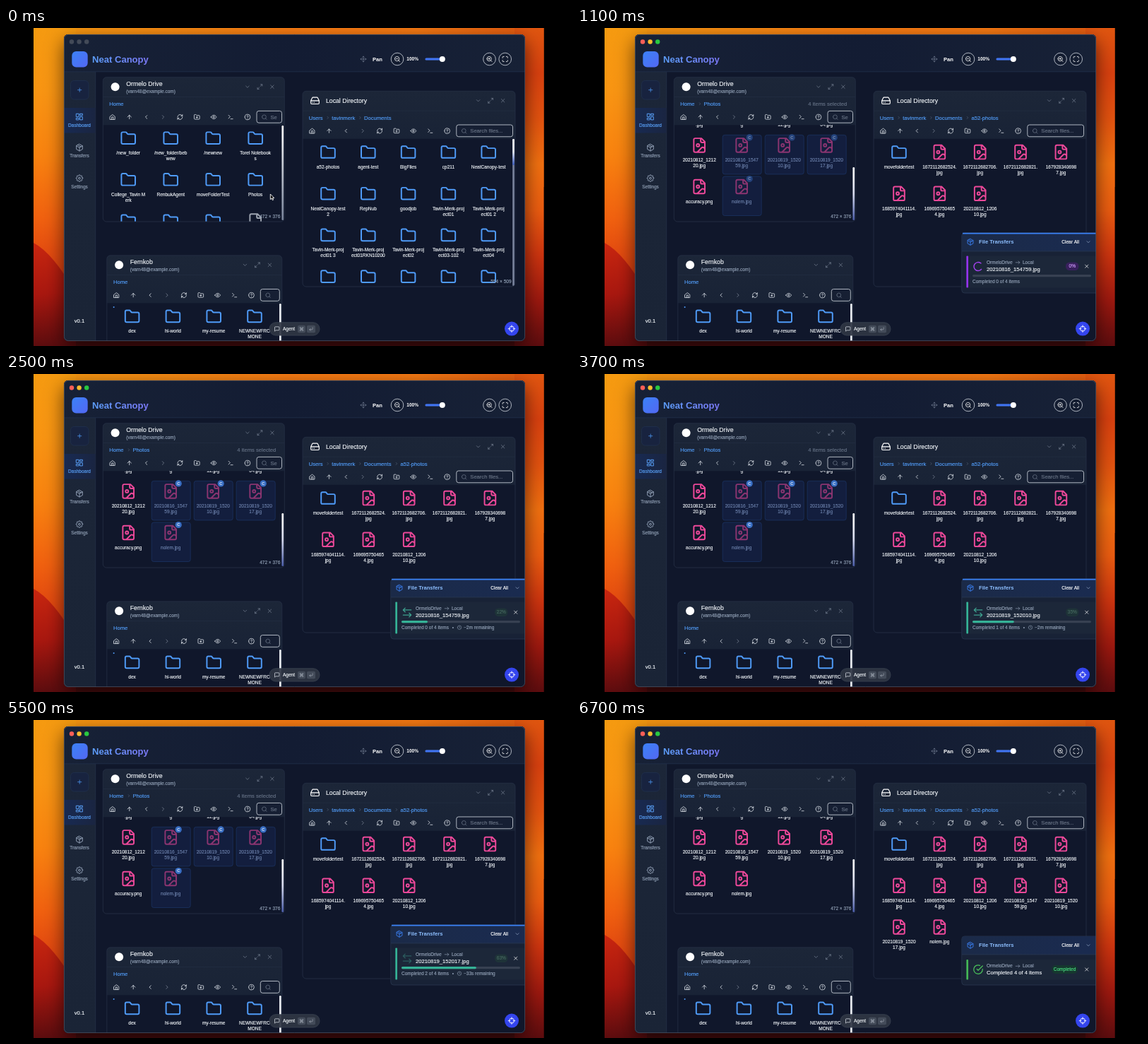
Write an HTML page with a canvas that moves like this. It is 800x450 px and loops after 6.8 s.

```html
<!DOCTYPE html>
<html lang="en">
<head>
<meta charset="utf-8">
<title>File dashboard</title>
<style>
html, body { margin: 0; width: 100%; height: 100%; overflow: hidden; background: #000; }
canvas { display: block; width: 800px; height: 450px; }
</style>
</head>
<body>
<canvas id="stage"></canvas>
<script>
const LOOP = 6800, STEP = 100;
const FONT = '"Liberation Sans", Arial, sans-serif';
const SM = 6.53, MD = 7.62, LG = 8.71;
const WHITE = '#f1f5f9', GRAY = '#94a3b8', DIM = '#64748b', BLUE = '#4f9bf8', PINK = '#ec4899';

const canvas = document.getElementById('stage');
const ctx = canvas.getContext('2d');
const dpr = window.devicePixelRatio || 1;
canvas.width = 800 * dpr;
canvas.height = 450 * dpr;

// ---- icons on a 24 unit grid ----
const ring = (x, y, r) => `M${x - r} ${y}a${r} ${r} 0 1 0 ${2 * r} 0 ${r} ${r} 0 1 0 ${-2 * r} 0`;
const folder = 'M20 20a2 2 0 0 0 2-2V8a2 2 0 0 0-2-2h-7.9a2 2 0 0 1-1.7-.9L9.6 3.9A2 2 0 0 0 7.9 3H4a2 2 0 0 0-2 2v13a2 2 0 0 0 2 2z';
const file = 'M15 2H6a2 2 0 0 0-2 2v16a2 2 0 0 0 2 2h12a2 2 0 0 0 2-2V7zM14 2v4a2 2 0 0 0 2 2h4';
const search = ring(11, 11, 8) + 'M21 21l-4.3-4.3';

function gear() {
  let d = '';
  for (let i = 0; i < 32; i++) {
    const r = i % 4 < 2 ? 10 : 7.8, a = (i - 0.5) * Math.PI / 16;
    d += (i ? 'L' : 'M') + (12 + r * Math.cos(a)) + ' ' + (12 + r * Math.sin(a));
  }
  return d + 'z' + ring(12, 12, 3);
}

const ICONS = {
  home: 'M3 10l9-7 9 7v11H3zM9 21v-9h6v9',
  up: 'M12 19V5M5 12l7-7 7 7',
  left: 'M15 18l-6-6 6-6',
  right: 'M9 18l6-6-6-6',
  down: 'M6 9l6 6 6-6',
  refresh: 'M3 12a9 9 0 0 1 15-6.7L21 8M21 3v5h-5M21 12a9 9 0 0 1-15 6.7L3 16M3 21v-5h5',
  folder, file, search,
  addFolder: folder + 'M12 10v6M9 13h6',
  eye: 'M2 12s3.5-7 10-7 10 7 10 7-3.5 7-10 7S2 12 2 12z' + ring(12, 12, 3),
  term: 'M4 17l6-6-6-6M12 19h8',
  help: ring(12, 12, 10) + 'M9.1 9a3 3 0 0 1 5.8 1c0 2-3 3-3 3M12 17h.01',
  zoomIn: search + 'M11 8v6M8 11h6',
  zoomOut: search + 'M8 11h6',
  expand: 'M15 3h6v6M9 21H3v-6M21 3l-7 7M3 21l7-7',
  close: 'M18 6L6 18M6 6l12 12',
  disk: 'M22 12H2M5.5 5.1L2 12v6a2 2 0 0 0 2 2h16a2 2 0 0 0 2-2v-6l-3.5-6.9A2 2 0 0 0 16.8 4H7.2a2 2 0 0 0-1.7 1.1zM6 16h.01M10 16h.01',
  image: file + ring(10, 12, 2) + 'M20 17l-1.3-1.3a2.4 2.4 0 0 0-3.4 0L9 22',
  dash: 'M3 3h7v9H3zM14 3h7v5h-7zM14 12h7v9h-7zM3 16h7v5H3z',
  box: 'M12 2l9 5v10l-9 5-9-5V7zM3 7l9 5 9-5M12 12v10M7.5 4.5l9 5',
  gear: gear(),
  move: 'M12 2v20M2 12h20M9 5l3-3 3 3M9 19l3 3 3-3M5 9l-3 3 3 3M19 9l3 3-3 3',
  full: 'M8 3H5a2 2 0 0 0-2 2v3M21 8V5a2 2 0 0 0-2-2h-3M3 16v3a2 2 0 0 0 2 2h3M16 21h3a2 2 0 0 0 2-2v-3',
  chat: 'M21 15a2 2 0 0 1-2 2H7l-4 4V5a2 2 0 0 1 2-2h14a2 2 0 0 1 2 2z',
  enter: 'M9 10l-5 5 5 5M20 4v7a4 4 0 0 1-4 4H4',
  cmd: 'M9 6a3 3 0 1 0-3 3h12a3 3 0 1 0-3-3v12a3 3 0 1 0 3-3H6a3 3 0 1 0 3 3z',
  target: ring(12, 12, 8) + 'M12 1v6M12 17v6M1 12h6M17 12h6',
  swap: 'M8 3L4 7l4 4M4 7h16M16 21l4-4-4-4M20 17H4',
  clock: ring(12, 12, 10) + 'M12 6v6l4 2',
  check: 'M22 11v1a10 10 0 1 1-6-9.1M22 4L12 14l-3-3',
  plus: 'M12 5v14M5 12h14',
  arrow: 'M3 12h18M15 6l6 6-6 6'
};
for (const k in ICONS) ICONS[k] = new Path2D(ICONS[k]);

// ---- drawing helpers ----
function icon(name, x, y, size, color, weight = 2) {
  ctx.save();
  ctx.translate(x - size / 2, y - size / 2);
  ctx.scale(size / 24, size / 24);
  ctx.lineWidth = weight;
  ctx.lineCap = ctx.lineJoin = 'round';
  ctx.strokeStyle = color;
  ctx.stroke(ICONS[name]);
  ctx.restore();
}

function text(s, x, y, size, color, align = 'left', bold = false) {
  ctx.font = `${bold ? 'bold ' : ''}${size}px ${FONT}`;
  ctx.textAlign = align;
  ctx.fillStyle = ctx.strokeStyle = color;
  ctx.fillText(s, x, y + size * 0.35);
  if (!bold) {
    ctx.lineWidth = 0.15;
    ctx.strokeText(s, x, y + size * 0.35);
  }
}

function rect(x, y, w, h, r, fill, stroke) {
  ctx.beginPath();
  ctx.roundRect(x, y, w, h, r);
  if (fill) { ctx.fillStyle = fill; ctx.fill(); }
  if (stroke) { ctx.strokeStyle = stroke; ctx.lineWidth = 0.8; ctx.stroke(); }
}

function disc(x, y, r, fill, stroke) {
  rect(x - r, y - r, 2 * r, 2 * r, r, fill, stroke);
}

function ramp(x0, y0, x1, y1, ...colors) {
  const g = ctx.createLinearGradient(x0, y0, x1, y1);
  colors.forEach((c, i) => g.addColorStop(i / (colors.length - 1), c));
  return g;
}

function clipped(x, y, w, h, r, draw) {
  ctx.save();
  ctx.beginPath();
  ctx.roundRect(x, y, w, h, r);
  ctx.clip();
  draw();
  ctx.restore();
}

function faded(alpha, draw) {
  ctx.save();
  ctx.globalAlpha *= alpha;
  draw();
  ctx.restore();
}

// ---- file lists; "|" breaks a label ----
const IMG = /\.(jpg|png)$/;
const plain = s => s.replace('|', '');
const shots = ['20210816_1547|59.jpg', '20210819_1520|10.jpg', '20210819_1520|17.jpg', 'nolem.jpg'];
const proj = s => 'Tavin-Merk-proj|ect' + s;

const driveRoot = ['/new_folder', '/new_folder/beb|wew', '/newnew', 'Torel Notebook|s',
  'College_Tavin M|erk', 'RenbukAgent', 'moveFolderTest', 'Photos', 'notes', 'drafts', 'misc', 'list.txt'];
const photos = ['20210812_1206|.jpg', '20210812_12070.jp|g', '20210812_1209|12.jpg', '20210812_1211|04.jpg',
  '20210812_1212|20.jpg', ...shots.slice(0, 3), 'accuracy.png', shots[3]];
const localRoot = ['a52-photos', 'agent-test', 'BigFiles', 'cp211', 'NeatCanopy-test',
  'NeatCanopy-test|2', 'RepNub', 'goodjob', proj('01'), proj('01 2'),
  proj('01 3'), proj('01RKN10200'), proj('02'), proj('03-102'), proj('04'), 'one', 'two', 'three', 'four', 'five'];
const localPhotos = ['movefoldertest', '1672112682524.|jpg', '1672112682706.|jpg', '1672112682821.|jpg',
  '167928340698|7.jpg', '1685974041114.|jpg', '169695750465|4.jpg', '20210812_1206|10.jpg'];
const boxRoot = ['dex', 'hi-world', 'my-resume', 'NEWNEWFRO|MONE'];

function entry(name, x, y, chosen, badge) {
  if (chosen) rect(x - 27, y - 14.5, 55, 55.5, 3, 'rgba(30,58,128,.22)', '#1b3361');
  faded(chosen ? 0.55 : 1, () => {
    if (IMG.test(plain(name))) icon('image', x, y, 23.5, PINK);
    else if (name.endsWith('.txt')) icon('file', x, y, 23.5, '#9ca3af');
    else icon('folder', x, y + 0.4, 23.5, BLUE);
    name.split('|').forEach((s, i) => text(s, x, y + 21 + i * 8.2, SM, chosen ? '#a9c4f5' : WHITE, 'center'));
  });
  if (chosen && badge > 0) faded(badge, () => {
    disc(x + 11, y - 11, 4.6, '#3b73cc');
    text('C', x + 11, y - 11, 5.6, '#fff', 'center');
  });
}

function grid(names, cols, x, y, dx, dy, chosen = [], badge = 0) {
  names.forEach((n, i) => entry(n, x + (i % cols) * dx, y + Math.floor(i / cols) * dy, chosen.includes(n), badge));
}

// ---- panels ----
const TOOLS = ['home', 'up', 'left', 'right', 'refresh', 'addFolder', 'eye', 'term', 'help'];

function panel(p, content) {
  const { x, y, w, h } = p;
  rect(x, y, w, h, 5, '#10172b');
  clipped(x, y, w, h, 5, () => {
    rect(x, y, w, 67.5, 0, ramp(0, y, 0, y + 67, '#1c2638', '#192336'));
    rect(x, y + 27.5, w, 0.7, 0, '#222e42');
    clipped(x, y + 67.5, w, h - 67.5, 0, content);
  });
  rect(x, y, w, h, 5, null, '#263247');

  const cy = y + 13.5;
  if (p.mail) {
    disc(x + 17.3, cy, 6, '#fff');
    text(p.title, x + 33, y + 9, LG, WHITE);
    text(p.mail, x + 33, y + 20.3, SM, GRAY);
  } else {
    icon('disk', x + 17.5, cy, 14, '#fff');
    text(p.title, x + 33, cy, LG, WHITE);
  }
  ['down', 'expand', 'close'].forEach((n, i) => icon(n, x + w - 52.4 + i * 17.5, cy, 9, '#7c8799', 1.8));

  p.path.forEach(([s, px], i) => {
    text(s, px, y + 37.6, MD, '#529df9');
    if (i) icon('right', px - 5.5, y + 37.6, 6, DIM);
  });
  if (p.note) text(p.note, x + w - 12, y + 37.6, MD, '#667286', 'right');

  const ty = y + 56.3;
  TOOLS.forEach((n, i) => icon(n, x + 13.5 + i * 23.9, ty, 9.2, n === 'right' ? '#7b8596' : '#e5eaf1'));
  rect(p.sx, y + 47.7, p.sw, 16.8, 3, '#161f33', '#d5dbe4');
  icon('search', p.sx + 10.8, ty + 0.2, 8.7, '#6b7688');
  clipped(p.sx, y + 47.7, p.sw - 6.5, 16.8, 3, () => {
    if (p.hint) text(p.hint, p.sx + 19.5, ty, MD, '#6b7688');
  });
}

const MAIL = '(varn48@example.com)';

function drivePanel(t) {
  const opened = t >= 300, scrolled = t >= 400, chosen = t >= 700 && t < 6500;
  const badge = Math.min(0.95, Math.max(0, (t - 800) / 700));
  panel({
    x: 137.3, y: 69.7, w: 257, h: 204.3, title: 'Ormelo Drive', mail: MAIL, sx: 355, sw: 35.5, hint: 'Search files...',
    path: opened ? [['Home', 146.3], ['Photos', 179.5]] : [['Home', 146.3]],
    note: chosen ? '4 items selected' : ''
  }, () => {
    if (!opened) grid(driveRoot, 4, 173.2, 155.8, 60, 58.6);
    else grid(photos, 4, 173.2, scrolled ? 107.3 : 155.8, 60, 58.6, chosen ? shots : [], badge);
    if (scrolled) rect(390.4, 197, 2.7, 75, 1.3, ramp(0, 197, 0, 272, '#fff', '#d5d9ec', '#4a5ca8'));
    else rect(390.4, 138, 2.7, 134, 1.3, ramp(0, 138, 0, 272, '#fff', '#b8bec9', '#78839a'));
    text('472 × 376', 388.3, 267, SM, GRAY, 'right');
  });
}

function localPanel(t) {
  const opened = t >= 600;
  const path = [['Users', 428.8], ['tavinmerk', 461.3], ['Documents', 507]];
  if (opened) path.push(['a52-photos', 558.5]);
  panel({ x: 420, y: 89.3, w: 301, h: 276.7, title: 'Local Directory', path, sx: 637.8, sw: 79.7, hint: 'Search files...' }, () => {
    if (opened) grid(t >= 6500 ? localPhotos.concat(shots) : localPhotos, 5, 456, 175.6, 57.35, 58.7);
    else {
      grid(localRoot, 5, 456, 175.6, 56.8, 58.7);
      rect(717.2, 157, 2.7, 208, 1.3, '#77819a');
      rect(717.2, 157, 2.7, 37, 1.3, ramp(0, 157, 0, 194, '#fff', '#dfe5f5', '#3556b8'));
    }
    text('554 × 509', 715.5, 359, SM, GRAY, 'right');
  });
}

function boxPanel() {
  panel({ x: 142.8, y: 321.8, w: 248, h: 160, title: 'Fernkob', mail: MAIL, sx: 360.3, sw: 27, path: [['Home', 152]] }, () => {
    grid(boxRoot, 4, 178.6, 408, 57.8, 58.6);
    disc(152.6, 395, 1, BLUE);
    rect(387, 390, 2.7, 60, 1.3, '#e8ebf0');
  });
}

// ---- transfers ----
// start, file, percent, percent per second, time left; rate 0 means preparing
const STAGES = [
  [900, 0, 0, 0, ''], [1800, 0, 10, 17.15, '~2m'],
  [2700, 1, 25, 0, '~2m'], [3400, 1, 30, 16.7, '~2m'],
  [4200, 2, 50, 0, '~44s'], [5000, 2, 56, 14, '~33s'],
  [5800, 3, 75, 0, '~20s'], [6200, 3, 83, 43, '~9s']
];

function transferHead(y) {
  rect(544.8, y, 200, 375 - y, 4, '#182236', '#293650');
  rect(545, y, 200, 25.5, [4, 0, 0, 0], ramp(545, 0, 735, 0, '#1b2a48', '#1a2b50'));
  rect(545, y + 25.5, 200, 0.7, 0, '#2a3a58');
  icon('box', 557, y + 12.8, 10.5, '#3b82f6');
  text('File Transfers', 569, y + 12.8, MD, '#8bbcfb', 'left', true);
  text('Clear All', 686.3, y + 12.8, SM, '#fff');
  icon('down', 724, y + 12.8, 8, '#9db0d0');
}

function transferRoute(y) {
  text('OrmeloDrive', 580, y, SM, GRAY);
  icon('arrow', 624, y + 0.3, 7.5, GRAY);
  text('Local', 631, y, SM, GRAY);
}

function transfers(t) {
  if (t < 900) return;
  if (t >= 6500) {
    transferHead(306);
    rect(551.5, 339, 183, 28.5, 2, '#1c2739');
    rect(551.3, 339, 2.7, 28.5, 1, '#44b556');
    icon('check', 568, 353, 15, '#4ac25a');
    transferRoute(348);
    text('Completed 4 of 4 items', 580, 357.6, MD, WHITE);
    rect(672, 347, 37, 12, 6, '#16372f');
    text('Completed', 690.5, 353, SM, '#4ade80', 'center');
    icon('close', 721.7, 353, 8.5, '#fff');
    return;
  }
  const [start, idx, from, rate, left] = STAGES.filter(s => s[0] <= t).pop();
  const pct = Math.round(from + rate * (t - start) / 1000);
  const tone = rate ? '#35b296' : '#9333ea';

  transferHead(290);
  rect(546, 289.8, 200, 1.6, 0, '#3b82f6');
  rect(551.5, 322.5, 183, 45, 2, '#1c2739');
  rect(551.3, 322.5, 2.7, 45, 1, tone);
  if (rate) {
    const pulse = 0.68 + 0.27 * Math.cos((t - 2500) / 1200 * 2 * Math.PI);
    faded(pulse, () => icon('swap', 568, 337.5, 17, '#3fa692', 1.8));
  } else {
    const a = t / 1000 * 2 * Math.PI;
    ctx.beginPath();
    ctx.arc(568, 337.5, 6, a, a + 4.9);
    ctx.strokeStyle = '#a340ee';
    ctx.lineWidth = 1.4;
    ctx.stroke();
  }
  transferRoute(331.5);
  text(plain(shots[idx]), 580, 341.6, MD, WHITE);
  rect(692, 331.5, 18.5, 11.5, 5.5, rate ? '#1e3338' : '#38205c');
  text(pct + '%', 701.3, 337.2, SM, rate ? '#46695f' : '#cf9bfd', 'center');
  icon('close', 721.7, 337.2, 8.5, '#fff');
  rect(560, 349, 168, 3.2, 1.6, '#374152');
  if (pct) rect(560, 349, 168 * pct / 100, 3.2, 1.6, rate ? '#35b296' : ramp(560, 0, 645, 0, '#8b2fe0', '#b03cf5'));
  text(`Completed ${idx} of 4 items`, 560, 358.7, SM, GRAY);
  if (left) {
    text('•', 633, 358.7, SM, GRAY, 'center');
    icon('clock', 642, 358.7, 6.6, GRAY);
    text(left + ' remaining', 648, 358.7, SM, GRAY);
  }
}

// ---- surroundings ----
function wallpaper() {
  rect(0, 0, 800, 450, 0, '#000');
  clipped(39, 0, 722.5, 450, 0, () => {
    rect(39, 0, 723, 225, 0, ramp(39, 0, 762, 0, '#f59a10', '#f58a12', '#f67a12', '#f47812', '#e0560f'));
    rect(39, 225, 723, 225, 0, '#4a0c0d');
    rect(39, 0, 60, 450, 0, ramp(39, 0, 60, 450, '#f59a10', '#f89412', '#f8820f', '#f0600f', '#d83a10', '#b0200f'));
    rect(720, 0, 42, 450, 0, ramp(735, 0, 750, 450,
      '#e0560f', '#d8400f', '#e2520f', '#f07010', '#ea5c10', '#cc340f', '#9c180f', '#5c0c0e'));
    ctx.beginPath();
    ctx.moveTo(39, 304);
    ctx.quadraticCurveTo(66, 318, 99, 375);
    ctx.lineTo(99, 450);
    ctx.lineTo(39, 450);
    ctx.fillStyle = ramp(39, 304, 50, 450, '#c8260f', '#a8170f', '#5c0c0e');
    ctx.fill();
    // soft shadow below the window
    ctx.shadowColor = 'rgba(0,0,0,.6)';
    ctx.shadowBlur = 26 * dpr;
    ctx.shadowOffsetY = 9 * dpr;
    rect(82, 9, 653, 434, 6, '#10172b');
  });
}

function sideItem(name, label, y, color) {
  icon(name, 104, y, 11.5, color);
  text(label, 104, y + 11.7, SM, color, 'center');
}

function chrome(t) {
  rect(82, 9, 653, 434, 0, '#10172b');
  rect(82, 9, 653, 53, 0, ramp(82, 0, 735, 0, '#172136', '#131c33', '#172136'));
  rect(82, 62, 45, 381, 0, ramp(0, 62, 0, 443, '#1c2638', '#1a2436'));
  rect(126.5, 62, 0.7, 381, 0, '#253149');
  rect(82, 61.5, 653, 0.8, 0, '#22304c');
  const lights = t < 100 ? ['#434a58', '#434a58', '#434a58'] : ['#ff5f57', '#febc2e', '#28c840'];
  lights.forEach((c, i) => disc(93 + i * 10.6, 19.5, 3.2, c));

  rect(93.3, 33, 22.4, 22.4, 6, ramp(93, 33, 116, 55, '#3b82f6', '#5368f3'));
  text('Neat Canopy', 122, 44, 13.07, ramp(122, 0, 201, 0, '#5b9df9', '#7a78f5'), 'left', true);

  icon('move', 506, 44, 9.5, '#768196', 1.7);
  text('Pan', 519, 44, MD, '#fff', 'left', true);
  text('100%', 567.3, 44, SM, '#fff', 'left', true);
  [['zoomOut', 554], ['zoomIn', 684.5], ['full', 706.7]].forEach(([n, x]) => {
    disc(x, 44, 8.8, '#141d31', '#d5dbe4');
    icon(n, x, 44, 9.5, '#fff');
  });
  rect(593.5, 42.5, 28.5, 3, 1.5, '#39465c');
  rect(593.5, 42.5, 24, 3, 1.5, '#3f74f5');
  disc(617.8, 44, 4, '#fff');

  rect(91.5, 74.5, 25.5, 26.5, 5, '#18233f', '#20304f');
  icon('plus', 104.2, 87.7, 9, BLUE);
  rect(82, 113, 44.5, 35.5, 0, ramp(82, 0, 127, 0, '#182a52', '#1a2541'));
  sideItem('dash', 'Dashboard', 125.6, '#5aa2fa');
  sideItem('box', 'Transfers', 169.2, GRAY);
  sideItem('gear', 'Settings', 212.6, GRAY);
  text('v0.1', 104, 414.7, MD, WHITE, 'center');
}

function floating() {
  rect(373, 416.7, 71, 18.3, 9, 'rgba(47,54,68,.92)', '#3a4352');
  icon('chat', 383.7, 426, 8.5, '#dfe4ec');
  text('Agent', 392, 426, SM, '#f1f5f9');
  rect(413, 420.7, 11, 10.5, 2, '#434b59');
  icon('cmd', 418.5, 426, 6.5, '#b8c0cc');
  rect(426, 420.7, 12, 10.5, 2, '#434b59');
  icon('enter', 432, 426, 6.5, '#b8c0cc');
  disc(716, 425.6, 10, '#3445ee');
  icon('target', 716, 425.6, 10.5, '#fff');
}

function cursor(x, y) {
  const p = new Path2D('M0 0v7.6l1.8-1.6 1.3 2.7 1.2-.6L3.1 5.5h2.3z');
  ctx.save();
  ctx.translate(x, y);
  ctx.fillStyle = '#000';
  ctx.strokeStyle = '#fff';
  ctx.lineWidth = 0.9;
  ctx.fill(p);
  ctx.stroke(p);
  ctx.restore();
}

function draw(t) {
  ctx.setTransform(dpr, 0, 0, dpr, 0, 0);
  wallpaper();
  clipped(82, 9, 653, 434, 6, () => {
    chrome(t);
    drivePanel(t);
    localPanel(t);
    boxPanel();
    transfers(t);
    floating();
  });
  rect(82.4, 9.4, 652.2, 433.2, 6, null, '#4b5262');
  if (t < 300) cursor(374.3, 235);
}

const begin = performance.now();
function tick() {
  const t = (performance.now() - begin) % LOOP;
  draw(Math.floor(t / STEP) * STEP);
  requestAnimationFrame(tick);
}
tick();
</script>
</body>
</html>
```
